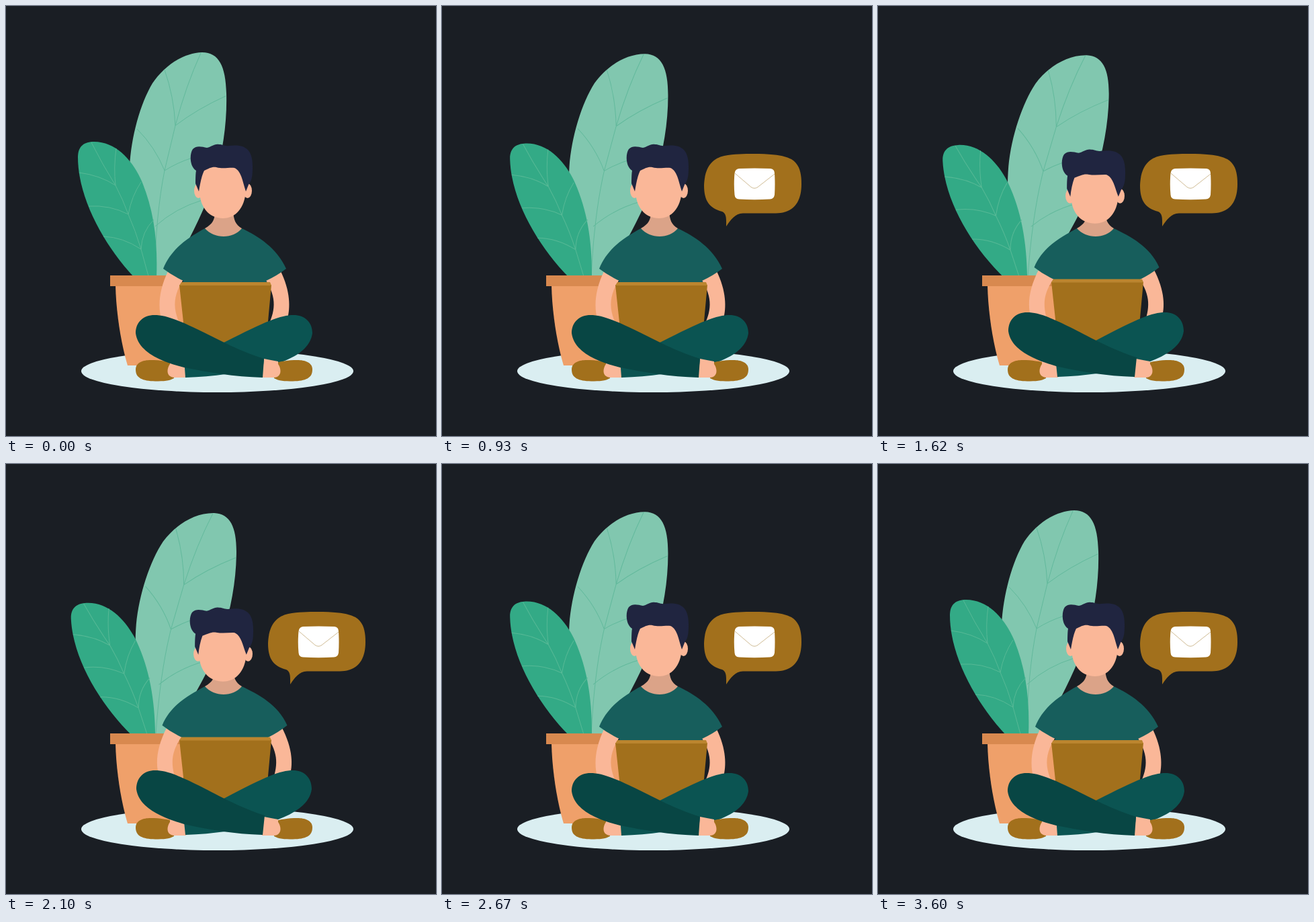
Animation, 640 px wide and 640 px high, one loop 3.63 s. Source, as an HTML page:

```html
<!DOCTYPE html>
<html lang="en">
<head>
<meta charset="utf-8">
<title>Working with a laptop</title>
<style>
  html, body { margin: 0; height: 100%; overflow: hidden; background: #1a1e24; }
  svg { display: block; width: 100vw; height: 100vh; }
  .vein { fill: none; stroke-width: 1; }
</style>
</head>
<body>
<svg viewBox="0 0 640 640">
  <defs>
    <path id="arm" fill="#fab798"
      d="M242 393C226 425 227 450 231 465L262 480C249 455 246 435 264 407Z"
      data-to="M240 391C222 425 223 450 228 465L254 475C246 450 243 432 262 405Z"/>
    <path id="leg"
      d="M193 487C193 470 205 460 221 460C240 460 262 469 323 500C345 511 365 519 384 525L382 553C340 552 300 545 265 538C238 531 197 518 193 487Z"
      data-to="M194 484C194 466 206 456 222 456C241 456 262 465 323 497C345 508 365 517 385 523L382 552C340 551 300 544 265 536C238 528 198 514 194 484Z"/>
    <g id="foot">
      <path fill="#a2701c" d="M193 541C193 530 205 527 215 527C230 527 240 529 252 532L250 554C243 558 235 558.500 222 558.500C203 558 193 554 193 541Z"/>
      <path fill="#fab798" d="M244 529Q255 527 265 525L268 553H250C238 552 239 540 244 533Z"/>
    </g>
  </defs>

  <ellipse cx="314.500" cy="543.500" rx="202.500" ry="31.500" fill="#daeef1"/>

  <g id="tallLeaf">
    <path fill="#81c7af" d="M238 404C258 378 285 325 302 283C320 236 329.500 180 328 130C327 90 317 69 292 69C262 70 235 90 218 115C200 145 186 195 184 240C182 300 195 360 222 404Z"/>
    <path class="vein" stroke="#62b99c" d="M290 70Q268 118 252 178L236 245Q223 310 221 402M236 95Q250 135 252 178Q285 153 327 134M195 183Q222 210 236 245Q255 233 277 226M222 328Q252 301 292 289"/>
  </g>
  <g id="shortLeaf">
    <path fill="#33aa86" d="M190 403C145 355 107 285 107 225C107 208 117 202 131 202C165 202 190 232 203 263C220 305 226 350 224 404Z"/>
    <path class="vein" stroke="#57b996" d="M127 203Q143 235 163 267Q174 288 182 310Q193 335 201 362L212 402M164 212Q160 240 163 267Q140 252 109 248M201 262Q187 283 182 310Q155 296 123 298M220 318Q202 336 201 362Q174 344 145 343"/>
  </g>

  <path fill="#efa06a" d="M163 416C164 460 172 505 181 535H264V416Z"/>
  <path fill="#d8894f" d="M155 401H262V417H155Z"/>

  <use href="#arm"/>
  <use href="#arm" transform="matrix(-1 0 0 1 650 0)"/>
  <path fill="#175e5c"
    d="M296 331H351C376 343 403 360 417 391Q404 401 387 409L390 413H262L264 409Q247 401 234 391C246 360 274 343 296 331Z"
    data-to="M296 331H351C376 343 405 358 418.500 389Q406 399 390 407L391 410H260L262 407Q245 399 232.500 389C245 358 274 343 296 331Z"/>
  <path fill="#dba388" d="M311 305C311 318 308 324 296 331C310 347 338 347 351 331C341 325 339 318 338 305Z"/>

  <g id="head">
    <g fill="#fab798">
      <ellipse cx="286.500" cy="275" rx="6.500" ry="11"/>
      <ellipse cx="359.500" cy="275" rx="6.500" ry="11"/>
    </g>
    <path fill="#202540" d="M287 276L282 264Q282 250 283 245C273 239 273 220 278 213C284 207 292 210 299 211C306 210 309 205 317 206C323 206 325 209 332 208C351 206 367 209 367 238C367 250 367 258 361 266L357 276Z"/>
    <path fill="#fab798"
      d="M287 276C289 264 291 253 295 245C302 242 306 239 313 240C323 243 332 240 340 241C351 246 352 262 357 276C355 300 342 316 323 316C304 316 292 302 289 285Z"
      data-to="M287 276C288 266 290 256 293 248C301 245 306 242 313 243C323 245 332 243 340 243.500C350 248 352 264 357 276C355 300 342 316 323 316C304 316 292 302 289 285Z"/>
  </g>

  <g id="laptop">
    <path fill="#a2701c" d="M258 415H395L389 480L323 506L265 480Z"/>
    <path fill="#bb852f" d="M261 411H393L395 416H258Z"/>
  </g>

  <use href="#foot"/>
  <use href="#leg" fill="#0b5452" transform="matrix(-1 0 0 1 649 0)"/>
  <use href="#foot" transform="matrix(-1 0 0 1 649 0)"/>
  <use href="#leg" fill="#084644"/>

  <g id="bubble">
    <path fill="#a2701c" d="M463 220C500 220 512 224 520 228C533 236 535 250 535 265C535 290 525 308 497 308.500H448C436 309 430 318 423 328C423 318 424 309 417 306C398 301 390 290 390 267C391 240 402 227 420 223C435 220 450 220 463 220Z"/>
    <path fill="#fff" d="M442 242Q465 241 489 242Q495 243 495 249Q496 265 495 281Q494 287 488 287.500Q465 289 442 287.500Q436 287 435.500 281Q434 265 435.500 249Q436 243 442 242Z"/>
    <path class="vein" stroke="#cfbb94" d="M436 249L460 269.500Q465 273 470 269.500L495 250"/>
  </g>
</svg>
<script>
const LOOP = 3630, SWAY = 3600;
const byId = id => document.getElementById(id);
const place = (id, transform) => byId(id).setAttribute('transform', transform);
const numbers = d => d.match(/[\d.]+/g).map(Number);

const morphs = [...document.querySelectorAll('[data-to]')].map(path => {
  const d = path.getAttribute('d');
  return { path, d, from: numbers(d), to: numbers(path.dataset.to) };
});

// Smooth step from 0 to 1 between two times
function ease(t, start, end) {
  const u = Math.min(1, Math.max(0, (t - start) / (end - start)));
  return u * u * (3 - 2 * u);
}

function draw(t) {
  const sway = (1 - Math.cos(2 * Math.PI * t / SWAY)) / 2;
  place('tallLeaf', `rotate(${2.95 * sway} 218 443)`);
  place('shortLeaf', `rotate(${-2.93 * sway} 224 442)`);

  const slump = ease(t, 1020, 1440) - ease(t, 2160, 2580);
  for (const { path, d, from, to } of morphs) {
    let i = 0;
    path.setAttribute('d', d.replace(/[\d.]+/g, () => {
      const value = from[i] + (to[i] - from[i]) * slump;
      i++;
      return value.toFixed(2);
    }));
  }
  const widen = 1 + 0.022 * slump;
  place('head', `translate(${321 * (1 - widen)} ${7.7 * slump}) scale(${widen} 1)`);
  place('laptop', `translate(0 ${-4.5 * slump})`);

  const pop = ease(t, 180, 690);
  place('bubble', `translate(423 328) scale(${pop}) translate(-423 -328)`);
}

function tick() {
  draw(performance.now() % LOOP);
  requestAnimationFrame(tick);
}
tick();
</script>
</body>
</html>
```
